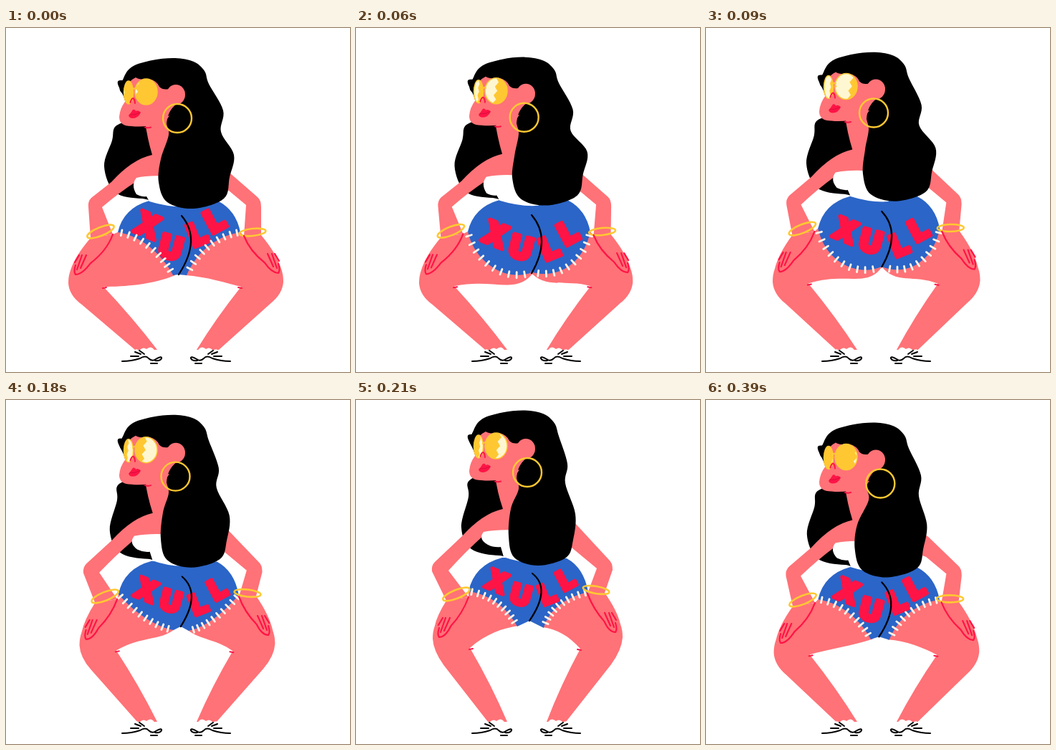
These frames come from a looping animation (480 by 480 pixels, 0.45 s). An HTML page with a canvas:

```html
<!DOCTYPE html>
<html lang="en">
<head>
<meta charset="utf-8">
<title>Dancer</title>
<style>
  html, body { margin: 0; width: 100%; height: 100%; overflow: hidden; background: #fff; }
  canvas { display: block; width: 100vw; height: 100vh; }
</style>
</head>
<body>
<canvas id="stage" width="480" height="480"></canvas>
<script>
const ctx = document.getElementById('stage').getContext('2d');
const SKIN = '#ff7277', BLUE = '#2b65c7', RED = '#ff1446', YELLOW = '#ffc832', CREAM = '#fff7d2';

// Each step: start time in ms and position in a cycle of six beats.
const STEPS = [[0, 0], [30, .5], [60, 1], [90, 1.5], [120, 2], [180, 2.5], [210, 3], [300, 4], [390, 5]];
const LOOP = 450;
const LIFT = [0, .05, .55, 1, .8, .38];  // crouched 0, raised 1
const ROUND = [0, 1, 1, 0, 0, 0];        // hem hollow 0, bulging 1

let lift, round, sway, headY;

const mix = (a, b, t) => a + (b - a) * t;
const between = (a, b, t, u = t) => [mix(a[0], b[0], t), mix(a[1], b[1], u)];
const move = ([x, y], dx, dy) => [x + dx, y + dy];

// A body point: crouched place, shift when raised, shift when the hem bulges.
const at = (x, y, dx = 0, dy = 0, rx = 0, ry = 0) => [x + dx * lift + rx * round, y + dy * lift + ry * round];
const onHead = (x, y) => [x, y + headY];
// Loose hair trails behind the body.
const loose = (...point) => move(at(...point), 6 * sway, -4 * sway);

function beat(values, phase) {
  const i = Math.floor(phase);
  return mix(values[i], values[(i + 1) % values.length], phase - i);
}

function fill(path, color) {
  ctx.fillStyle = color;
  ctx.fill(new Path2D(path));
}

function line(path, color, width) {
  ctx.strokeStyle = color;
  ctx.lineWidth = width;
  ctx.stroke(new Path2D(path));
}

function oval(x, y, rx, ry = rx, degrees = 0) {
  ctx.beginPath();
  ctx.ellipse(x, y, rx, ry, degrees * Math.PI / 180, 0, 2 * Math.PI);
}

function ring([x, y], rx, ry, degrees, width) {
  oval(x, y, rx, ry, degrees);
  ctx.strokeStyle = YELLOW;
  ctx.lineWidth = width;
  ctx.stroke();
}

// Closed smooth curve through all points.
function blob(points, color) {
  const n = points.length, point = i => points[(i + n) % n];
  let path = `M${points[0]}`;
  for (let i = 0; i < n; i++) {
    const [p, a, b, q] = [point(i - 1), point(i), point(i + 1), point(i + 2)];
    path += `C${a.map((v, k) => v + (b[k] - p[k]) / 6)} ${b.map((v, k) => v - (q[k] - a[k]) / 6)} ${b}`;
  }
  fill(path, color);
}

function drawLeg({ knee, bend, curve, crotch, ankle }, wrist, palm, hip, side) {
  const [out, inner] = ankle.map(x => [x, 449]);
  fill(`M${wrist}Q${between(wrist, knee, .7, .4)} ${move(knee, side * 3, -18)}Q${move(knee, 0, -10)} ${knee}
    Q${move(knee, side, 17)} ${between(knee, out, .2, .32)}L${out}L${inner}
    Q${move(between(bend, inner, .5), side * 4, 0)} ${bend}C${curve} ${crotch}L240 270L${hip}L${palm}Z`, SKIN);
  line(`M${move(bend, -side, 2)}l${side * 5} -1`, RED, 2);
}

function drawHand(tip, palm, side) {
  const near = (dx, dy) => move(tip, side * dx, dy);
  line(`M${palm}Q${move(between(palm, tip, 0, .4), -side * 8, 0)} ${between(palm, tip, .6, .72)}
    Q${near(9, 0)} ${tip}Q${near(-3, -4)} ${near(0, -13)}
    M${near(2, -7)}L${near(9, -27)}M${near(7, -9)}L${near(15, -27)}M${near(-1, -17)}L${near(5, -27)}`, RED, 2.2);
}

function drawStitches([a, b, c, d]) {
  let path = '';
  for (let i = 0; i < 10; i++) {
    const t = (i + .5) / 10.5, u = 1 - t;
    const [x, y] = [0, 1].map(k => u ** 3 * a[k] + 3 * u * u * t * b[k] + 3 * u * t * t * c[k] + t ** 3 * d[k]);
    const [dx, dy] = [0, 1].map(k => u * u * (b[k] - a[k]) + 2 * u * t * (c[k] - b[k]) + t * t * (d[k] - c[k]));
    const s = 4 / Math.hypot(dx, dy);
    path += `M${x - dy * s} ${y + dx * s}L${x + dy * s} ${y - dx * s}`;
  }
  line(path, '#fff6ea', 2.8);
}

// Faces left; side -1 mirrors it.
function drawShoe(x, side) {
  ctx.save();
  ctx.translate(x, 0);
  ctx.scale(side, 1);
  fill('M18 451q3 -5 8 -1q5 -6 10 -2q6 -5 10 0q2 5 8 9v7h-50z', '#fff');
  line('M2 465q13 0 25 -4q8 -5 12 0q5 5 10 1q9 -5 8 -1q-2 4 -9 3M42 468h9M20 452l8 3M26 450l7 5M14 458l11 0', '#000', 2);
  ctx.restore();
}

function drawLens(x, y, rx, ry, left, right) {
  ctx.save();
  oval(x, y, rx, ry);
  ctx.clip();
  ctx.fillStyle = YELLOW;
  ctx.fill();
  const edge = shift => [...Array(7)].map((_, i) =>
    [x + rx * (shift + (i % 2 ? .16 : -.12) + (3 - i) * .06), y + ry * (i - 3) / 3]);
  fill(`M${edge(left).join('L')}L${edge(right).reverse().join('L')}Z`, CREAM);
  ctx.restore();
  ring([x, y], rx, ry, 0, 1.5);
}

function drawHead(phase) {
  // a zigzag glint sweeps across the glasses
  const glint = [Math.min(.8 * phase - 2.2, .85), .85 * phase - .9];
  ctx.save();
  ctx.translate(0, headY);
  fill(`M167 86Q170 74 181 69Q187 73 200 71Q211 74 214 82Q219 87 227 85L238 106Q225 116 224 134L213 133
    Q195 139 175 137Q158 137 158 124Q159 112 166 103Z`, SKIN);
  oval(237, 93, 13, 14);
  ctx.fill();
  line('M194 138.5q4 1.500 8 0', RED, 2);
  drawLens(171, 90, 6.5, 16, ...glint);
  drawLens(195.5, 89, 15.5, 18, ...glint);
  line('M177 86q2 -3 4 -1', YELLOW, 2);
  line('M173.5 104Q175 98 177.500 98Q180 100 180 105', RED, 2);
  fill('M171 122Q174 119 177 114Q180 113 181 116Q185 114 188 118Q184 126 177 126Q172 126 171 122Z', RED);
  line('M173 121q7 1 14 -3', '#d80e3c', 1);
  ctx.restore();
}

function drawLetter(letter, [x, y], degrees) {
  const size = 44 - 5 * lift;
  ctx.save();
  ctx.translate(x, y);
  ctx.rotate(degrees * Math.PI / 180);
  ctx.font = `900 ${size}px Inter, "DejaVu Sans", sans-serif`;
  ctx.textAlign = 'center';
  ctx.fillStyle = ctx.strokeStyle = RED;
  ctx.lineWidth = size / 8;
  ctx.fillText(letter, 0, size * .36);
  ctx.strokeText(letter, 0, size * .36);
  ctx.restore();
}

function drawBackHair() {
  blob([onHead(160, 73), onHead(165, 98), onHead(172, 125), at(152, 138, 4, -23), at(148, 157, 9, -22),
    at(137, 193, 10, -15), at(152, 229, 9, -21), at(190, 238, 10, -21), at(232, 233, 0, -23), onHead(232, 100)], '#000');
}

function drawFrontHair() {
  blob([
    [161, 90], [164, 70], [176, 54], [204, 45], [236, 42], [262, 47], [277, 60], [283, 78]
  ].map(([x, y]) => [x, y + headY * 1.1]).concat([
    at(303, 115, -8, -26), at(300, 145, -8, -29), loose(318, 177, -12, -18), loose(312, 208, -9, -13),
    loose(304, 238, -11, -18), loose(262, 252, -8, -21), loose(225, 243, -4, -23), loose(213, 215, 0, -25),
    loose(216, 183, 0, -31), onHead(227, 149), onHead(224, 130), onHead(234, 109), onHead(200, 104)]), '#000');
}

function drawTop(armpit) {
  const bust = at(182, 232, 2, -30), waist = at(200, 242, 6, -23);
  fill(`M${armpit}Q${move(armpit, -8, 10)} ${bust}Q${move(bust, 8, 4)} ${waist[0] - 4} ${bust[1] + 3}L${waist}
    Q230 ${waist[1] + 9} 255 ${waist[1] + 7}L228 ${armpit[1] - 2}Q200 ${armpit[1] - 4} ${armpit}Z`, '#fff');
}

function drawShorts(hemL, hemR) {
  const [hipL, l1, l2, endL] = hemL, [hipR, r1, r2, endR] = hemR;
  const beltL = at(200, 241, 4, -21), beltR = at(295, 241, -1, -20);
  const seamEnd = at(241, 344, 1, -36, 4, 0);
  fill(`M${beltL}Q${hipL[0] + 8} ${beltL[1] + 10} ${hipL}C${l1} ${l2} ${endL}L${seamEnd}L${endR}
    C${r2} ${r1} ${hipR}Q${hipR[0] - 6} ${beltR[1] + 13} ${beltR}Z`, BLUE);
  drawLetter('X', at(198, 275, -1, -22, -3, 14), 22);
  drawLetter('U', at(230, 306, 0, -34, 0, 2), 15);
  drawLetter('L', at(267, 287, 0, -17, 3, 20), -22);
  drawLetter('L', at(291, 268, 2, -18, 5, 18), -28);
  line(`M${at(245, 262, 1, -20)}Q${at(273, 295, 0, -32)} ${seamEnd}`, '#000', 2.2);
  drawStitches(hemL);
  drawStitches(hemR);
}

function draw(phase) {
  lift = beat(LIFT, phase);
  round = beat(ROUND, phase);
  sway = Math.sin(phase * Math.PI / 3);
  headY = -25 * lift;

  const shoulder = at(204, 177, 1, -25), armpit = at(182, 209, -4, -25);
  const elbowL = at(115, 242, -9, -11), innerL = at(134, 250, -5, -12), bandL = at(132, 284, 8, -13);
  const elbowR = at(356, 242, 2, -13), innerR = at(335, 247, 1, -12), bandR = at(344, 285, -9, -20);
  const sleeveTop = at(312, 202, -8, -32), sleeveLow = at(311, 227, -10, -21);
  const wristL = move(bandL, -14, 9), palmL = move(bandL, 17, 4);
  const wristR = move(bandR, 12, 4), palmR = move(bandR, -12, 5);
  const hemL = [at(156, 285, 1, -18), at(192, 290, -2, -18, -27, 36),
    at(222, 322, -10, -30, -14, 36), at(233, 345, -8, -29, 14, -3)];
  const hemR = [at(327, 285, -3, -17), at(294, 290, -2, -15, 25, 35),
    at(266, 312, 3, -19, 18, 42), at(252, 345, 10, -27, -10, -4)];
  const kneeDrop = -23 * lift * lift;
  const legL = {
    knee: move(at(87, 356, 20), 0, kneeDrop), bend: at(136, 361, 23, -15),
    curve: [at(165, 361, 15, -34, 25, -11), at(205, 358, 0, -40, 21, 18)],
    crotch: at(236, 345, -9, -30, 13, -4), ankle: [180 + 4 * lift, 211]
  };
  const legR = {
    knee: move(at(387, 354, -15), 0, kneeDrop), bend: at(328, 361, -15, -14),
    curve: [at(308, 356, -10, -26, -15, -5), at(280, 347, 0, -28, -15, 20)],
    crotch: at(250, 345, 10, -28, -8, -4), ankle: [297 - 4 * lift, 266]
  };

  ctx.fillStyle = '#fff';
  ctx.fillRect(0, 0, 480, 480);
  ctx.lineCap = ctx.lineJoin = 'round';

  drawBackHair();
  // neck, back and left arm
  fill(`M${onHead(194, 130)}Q${between(onHead(197, 130), shoulder, 0, .5)} ${shoulder}
    Q${move(shoulder, -28, 6)} ${move(shoulder, -57, 38)}L${move(elbowL, 4, -5)}
    Q${move(elbowL, -1, 0)} ${move(elbowL, 0, 8)}L${wristL}L${palmL}L${innerL}
    Q${between(innerL, armpit, .5)} ${move(armpit, 0, 5)}L238 ${armpit[1] + 4}L${onHead(238, 120)}Z`, SKIN);
  // right arm
  fill(`M${sleeveTop}L${move(elbowR, -5, -6)}Q${move(elbowR, 0, -2)} ${move(elbowR, 0, 8)}L${wristR}L${palmR}
    L${innerR}L${sleeveLow}L${move(sleeveLow, -40, -15)}L${move(sleeveTop, -40, -10)}Z`, SKIN);
  drawLeg(legL, wristL, palmL, hemL[0], 1);
  drawLeg(legR, wristR, palmR, hemR[0], -1);
  drawShorts(hemL, hemR);
  drawTop(armpit);
  drawFrontHair();
  drawHead(phase);
  ring(onHead(239 - 5 * sway, 126), 20, 20, 0, 2.4);
  ring(bandL, 20, 6, -22, 2.6);
  ring(bandR, 18.5, 5, -6 + 16 * lift, 2.6);
  drawHand(at(97, 344, 19, -13), palmL, 1);
  drawHand(at(380, 342, -18, -18), palmR, -1);
  drawShoe(160, 1);
  drawShoe(315, -1);
}

function tick() {
  const time = performance.now() % LOOP;
  draw(STEPS.findLast(([start]) => start <= time)[1]);
  requestAnimationFrame(tick);
}
tick();
</script>
</body>
</html>
```
